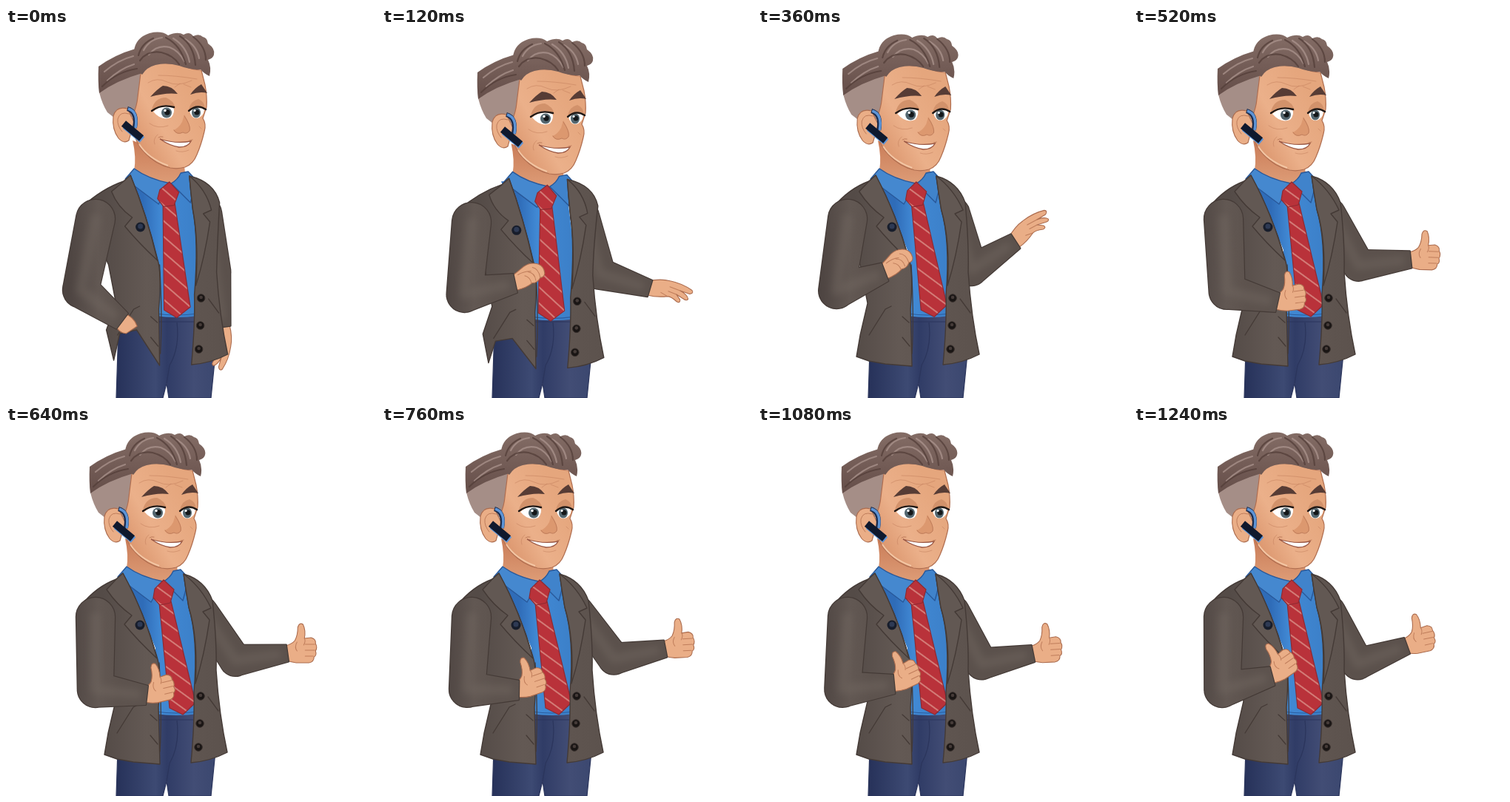
An HTML page for the animation above (1.28 s loop, 500 by 500 pixels).

```html
<!DOCTYPE html>
<html lang="en">
<head>
<meta charset="utf-8">
<title>Thumbs up</title>
<style>
html, body { margin: 0; width: 100%; height: 100%; overflow: hidden; background: #fff; }
svg { display: block; width: 100%; height: 100%; }
.cloth { stroke: #443a36; stroke-width: 1.4; stroke-linejoin: round; }
.sleeve { fill: url(#wool); paint-order: stroke; stroke-width: 2.4; }
.sheen { fill: none; stroke: #756a64; stroke-width: 13; stroke-linecap: round; stroke-linejoin: round; opacity: .4; filter: url(#soft); }
.skin { fill: #eaae87; stroke: #ac6c4e; stroke-width: 1.1; stroke-linejoin: round; }
.line { fill: none; stroke: #443a36; stroke-width: 1.3; stroke-linecap: round; }
.crease { fill: none; stroke: #bf7d5b; stroke-width: 1; stroke-linecap: round; }
.faint { opacity: .5; }
.lock { fill: none; stroke: #ab958e; stroke-width: 2.2; stroke-linecap: round; opacity: .75; }
.shadow { stroke: #533e39; }
</style>
</head>
<body>
<svg viewBox="0 0 500 500">
<defs>
  <filter id="soft" x="-50%" y="-50%" width="200%" height="200%"><feGaussianBlur stdDeviation="5"/></filter>
  <linearGradient id="wool" gradientUnits="userSpaceOnUse" x1="84" y1="0" x2="152" y2="0">
    <stop offset="0" stop-color="#4d4441"/><stop offset=".6" stop-color="#625853"/><stop offset="1" stop-color="#5d534e"/>
  </linearGradient>
  <linearGradient id="coat" gradientUnits="userSpaceOnUse" x1="130" y1="0" x2="300" y2="0">
    <stop offset="0" stop-color="#544b47"/><stop offset=".35" stop-color="#635954"/><stop offset="1" stop-color="#5c524d"/>
  </linearGradient>
  <linearGradient id="shirt" gradientUnits="userSpaceOnUse" x1="185" y1="0" x2="255" y2="0">
    <stop offset="0" stop-color="#2f6cb8"/><stop offset=".35" stop-color="#4189d4"/><stop offset="1" stop-color="#3c80c9"/>
  </linearGradient>
  <linearGradient id="denim" gradientUnits="userSpaceOnUse" x1="150" y1="0" x2="280" y2="0">
    <stop offset="0" stop-color="#27325a"/><stop offset=".4" stop-color="#3d4a73"/><stop offset=".52" stop-color="#303c66"/><stop offset=".8" stop-color="#424d75"/><stop offset="1" stop-color="#3c4870"/>
  </linearGradient>
  <linearGradient id="face" gradientUnits="userSpaceOnUse" x1="160" y1="150" x2="245" y2="100">
    <stop offset="0" stop-color="#dc976f"/><stop offset=".4" stop-color="#ebb08a"/><stop offset="1" stop-color="#e5a67d"/>
  </linearGradient>
  <linearGradient id="neck" x1="0" y1="0" x2="0" y2="1">
    <stop offset="0" stop-color="#c97c58"/><stop offset="1" stop-color="#e0a07a"/>
  </linearGradient>
  <linearGradient id="hair" gradientUnits="userSpaceOnUse" x1="0" y1="10" x2="0" y2="90">
    <stop offset="0" stop-color="#836c65"/><stop offset="1" stop-color="#654e49"/>
  </linearGradient>
  <pattern id="stripes" width="20" height="16" patternUnits="userSpaceOnUse" patternTransform="rotate(36)">
    <path d="M0 0H20V16H0Z" fill="#b9323a"/><path d="M0 8H20" stroke="#dc958c" stroke-width="1.5"/>
  </pattern>
  <g id="thumb">
    <path class="skin" d="M-3-10Q6-12 10-17Q14-24 14-35Q16-42 21-39Q25-31 23-20L32-21Q39-19 38-13Q41-8 38-3Q40 3 36 5Q36 12 29 13L12 13Q4 12-3 9Z"/>
    <path class="crease" d="M23-20Q25-16 22-11M24-12H37M24-4H37M24 4H35M13-15Q9-8 13-3"/>
  </g>
  <g id="fist">
    <path class="skin" d="M-3-10Q10-13 20-16Q31-18 39-11Q45-5 42 4Q39 9 34 7Q28 12 21 9Q12 12-3 9Z"/>
    <path class="crease" d="M30-10Q37-5 34 7M22-7Q30-2 27 8M16-4Q22 1 20 9M8-9Q18-10 26-6"/>
  </g>
  <g id="open">
    <path class="skin" d="M-3-10Q14-14 27-11Q44-8 57 1Q60 5 54 6L41 2Q51 7 52 13Q50 16 46 13L36 7L41 14Q42 19 37 17Q29 10 24 10Q10 12-3 9Z"/>
    <path class="crease" d="M41 2L27-3M36 7L25 3M24 10L15 5"/>
  </g>
  <path id="tucked" class="skin" d="M-4-10Q11-13 21-4L13 12Q4 16-4 10Z"/>
</defs>

<path d="M152 405L204 388H257L283 440L277 500H220L217 480L212 500H149Z" fill="url(#denim)" stroke="#2b355c" stroke-width="1.2"/>
<path d="M203 397H257M231 398Q235 432 221 456L217 480" fill="none" stroke="#2b355c" stroke-width="1.2"/>

<g id="armR"><g><use href="#open"/><use href="#open"/><use href="#thumb"/></g><path class="cloth sleeve" style="fill:#5b514c"/><path class="sheen"/></g>

<g id="torso">
  <path d="M161 203H248L260 300V389Q230 393 202 389V300Z" fill="url(#shirt)"/>
  <path d="M203 386Q230 390 258 386" fill="none" stroke="#2a5c9f" stroke-width="1.2"/>
</g>

<g id="collar">
  <path d="M161 152Q166 175 163 192L206 217L222 206L232 197L230 180Z" fill="url(#neck)"/>
  <path d="M163 190L151 204L196 238L212 210Q182 204 163 190Z" fill="#4588cf" stroke="#28589a" stroke-width="1.4" stroke-linejoin="round"/>
  <path d="M226 196L236 194L247 206L239 236L213 210Q222 205 226 196Z" fill="#4083cb" stroke="#28589a" stroke-width="1.4" stroke-linejoin="round"/>
</g>

<g id="tie" fill="url(#stripes)" stroke="#8f2a31" stroke-width="1.2" stroke-linejoin="round">
  <path d="M207 239L223 237L256 374L239 390L221 381Z"/>
  <path d="M201 220L213 208L227 221L222 239L208 242L199 232Z"/>
</g>

<g id="jacket">
  <path id="left" class="cloth" fill="url(#coat)"/>
  <path id="right" class="cloth" fill="url(#coat)"/>
  <path id="lapels" class="cloth" fill="#625853"/>
  <path class="line" d="M150 415L172 380L180 376M195 390L204 398M195 418L205 430M273 366L287 385M207 320Q211 390 208 440"/>
  <circle cx="181" cy="269" r="6.5" fill="#171d2b"/><circle cx="181" cy="268" r="3.5" fill="#2e3a54"/>
  <g fill="#191514" stroke="#39302d"><circle cx="263" cy="365" r="5.3"/><circle cx="262" cy="402" r="5.3"/><circle cx="260" cy="434" r="5.3"/></g>
  <g fill="#453b38"><circle cx="263" cy="364" r="2.3"/><circle cx="262" cy="401" r="2.3"/><circle cx="260" cy="433" r="2.3"/></g>
</g>

<g id="head">
  <path d="M113 70L114 90Q118 106 125 117L134 124L150 128L161 122L167 98L174 60Z" fill="#a58e87"/>
  <path d="M170 64Q178 54 192 50L222 52Q240 60 252 60L257 80Q260 95 259 110L254 125Q259 133 256 143Q252 160 246 174Q241 187 230 191Q220 194 210 192Q190 187 176 172Q163 160 160 140V119Q165 108 166 96Z" fill="url(#face)" stroke="#b06e50" stroke-width="1.2"/>
  <path d="M168 160Q180 179 207 189" fill="none" stroke="#f3c6a4" stroke-width="2"/>
  <path d="M113 55Q112 75 114 91Q137 74 172 64L176 56L163 31Q135 39 113 55Z" fill="url(#hair)"/>
  <path d="M161 34Q163 16 182 10Q198 6 207 13Q220 7 228 12Q236 7 241 14Q249 10 254 15Q260 16 261 24Q271 31 269 39Q268 44 261 46Q266 56 263 68Q256 65 251 59Q238 60 222 54Q205 49 190 53Q178 56 172 66Q161 58 167 47Q168 41 161 34Z" fill="url(#hair)"/>
  <path class="lock" d="M121 62Q140 46 160 41M125 74Q142 58 161 52M174 33Q182 18 199 16M181 39Q192 25 209 29Q222 34 229 48M214 17Q232 28 236 49M230 18Q246 27 249 44"/>
  <path class="lock shadow" d="M118 82Q138 62 165 58M167 40Q171 24 187 17M169 47Q179 33 198 36Q214 40 222 52M204 16Q224 26 231 52M223 14Q242 26 244 53M241 15Q258 28 258 46"/>
  <path class="crease faint" d="M180 77Q192 69 206 76T239 74M194 67Q217 67 246 72M216 83L223 78M228 79L238 83M182 132Q193 140 207 135M193 147Q186 153 189 160M249 136L252 139M218 169Q226 172 235 168"/>
  <g fill="#d2926b"><path d="M185 113Q189 97 204 97Q215 101 217 112Q202 102 185 113Z"/><path d="M235 113Q238 101 248 99Q256 102 257 112Q246 104 235 113Z"/></g>
  <g fill="#573c35"><path d="M183 96Q193 85 200 81Q212 81 220 92Q204 90 183 96Z"/><path d="M237 93Q243 84 252 79L260 91Q250 88 237 93Z"/></g>
  <g fill="#fff"><path d="M187 116Q199 106 214 110Q217 117 211 124Q198 129 187 116Z"/><path d="M236 115Q246 106 256 113Q255 123 246 125Q238 125 236 115Z"/></g>
  <g fill="#53666f"><circle cx="205" cy="117.500" r="7"/><ellipse cx="245" cy="117.500" rx="6" ry="7"/></g>
  <g fill="#141719"><circle cx="206" cy="117" r="3.7"/><circle cx="246" cy="117" r="3.500"/></g>
  <g fill="#fff"><circle cx="203" cy="114.500" r="1.7"/><circle cx="243" cy="114.500" r="1.6"/></g>
  <path d="M185 115Q198 105 215 110M235 115Q246 105 258 113" fill="none" stroke="#201815" stroke-width="2.4" stroke-linecap="round"/>
  <path d="M229 120Q237 133 237 140Q234 147 227 144Q220 149 214 141Q221 139 226 130Z" fill="#dc986f"/>
  <path class="crease" d="M229 122Q238 135 236 142Q232 147 227 144Q219 148 215 141"/>
  <path d="M196 153Q218 160 238 156Q234 164 222 164Q209 162 196 153Z" fill="#fff" stroke="#9a5743" stroke-width="1.3"/>
  <path d="M194 151Q197 149 200 150M236 155L240 154" class="crease"/>
  <path class="skin" d="M152 112Q137 108 133 122Q131 140 140 152Q147 160 154 155L161 130Z"/>
  <path class="crease" d="M154 119Q142 115 139 126Q138 135 145 143"/>
  <g fill="none">
    <path d="M152 112Q166 116 162 138" stroke="#1c2b4b" stroke-width="6"/>
    <path d="M153 112Q167 116 163 138" stroke="#5d94d6" stroke-width="3.500"/>
    <path d="M149 135L172 154" stroke="#5d94d6" stroke-width="10"/>
    <path d="M147 132L171 152" stroke="#0f192e" stroke-width="9.500"/>
  </g>
</g>

<g id="armL"><g><use href="#tucked"/><use href="#fist"/><use href="#thumb"/></g><path class="cloth sleeve"/><path class="sheen"/></g>
</svg>

<script>
const LOOP = 1280, STEP = 40;
const $ = id => document.getElementById(id);
const move = (id, x, y, more = '') => $(id).setAttribute('transform', `translate(${x} ${y}) ${more}`);
const clamp = (v, lo, hi) => Math.min(hi, Math.max(lo, v));
const mix = (a, b, k) => a + (b - a) * k;
const ease = (t, from, to) => { const k = clamp((t - from) / (to - from), 0, 1); return k * k * (3 - 2 * k); };

// key points: time, x, y
const headPath = [[0, 12, -3], [120, 16, 5], [240, 6, 0], [440, 0, 0]];
const arms = {
  armL: {
    shoulder: [121, 258], upper: 98, fore: 70, radii: [26, 24, 13], bend: [-7, -12, -20],
    wrist: [[0, 157, 396], [120, 180, 345], [240, 157, 303], [520, 194, 371], [760, 185, 357], [920, 181, 360], [1240, 187, 338]]
  },
  armR: {
    shoulder: [266, 250], upper: 80, fore: 71, radii: [19, 21, 11.5], bend: [6, -15, 8],
    wrist: [[0, 292, 404], [120, 362, 352], [240, 334, 272], [520, 374, 313], [760, 383, 301], [920, 377, 318], [1240, 369, 297]]
  }
};

// monotone cubic through the key points
function along(rows, t) {
  const last = rows.length - 1;
  if (t >= rows[last][0]) return rows[last].slice(1);
  const i = rows.findIndex(r => r[0] > t) - 1;
  const a = rows[i], b = rows[i + 1], h = b[0] - a[0], u = (t - a[0]) / h;
  const slope = (k, c) => (rows[k + 1][c] - rows[k][c]) / (rows[k + 1][0] - rows[k][0]);
  const tangent = (k, c) => {
    if (k === 0 || k === last) return 0;
    const p = slope(k - 1, c), q = slope(k, c);
    return p * q > 0 ? 2 * p * q / (p + q) : 0;
  };
  return [1, 2].map(c => mix(a[c], b[c], u * u * (3 - 2 * u))
    + h * u * (1 - u) * (tangent(i, c) * (1 - u) - tangent(i + 1, c) * u));
}

function taper(x1, y1, r1, x2, y2, r2, flat) {
  const a = Math.atan2(y2 - y1, x2 - x1), nx = Math.sin(a), ny = -Math.cos(a);
  const at = (x, y, r) => `${x + nx * r} ${y + ny * r}`;
  const end = flat ? 'L' : `A${r2} ${r2} 0 0 1 `;
  return `M${at(x1, y1, r1)}L${at(x2, y2, r2)}${end}${at(x2, y2, -r2)}`
    + `L${at(x1, y1, -r1)}A${r1} ${r1} 0 0 1 ${at(x1, y1, r1)}Z`;
}

// the elbow follows from the two bone lengths
function drawArm(id, t, shiftX, shiftY) {
  const { shoulder, upper, fore, radii: [rs, re, rw], bend, wrist } = arms[id];
  const sx = shoulder[0] + shiftX, sy = shoulder[1] + shiftY;
  const [wx, wy] = along(wrist, t);
  const reach = Math.hypot(wx - sx, wy - sy);
  const cos = (upper ** 2 + reach ** 2 - fore ** 2) / (2 * upper * reach);
  const a = Math.atan2(wy - sy, wx - sx) + Math.acos(clamp(cos, -1, 1));
  const ex = sx + upper * Math.cos(a), ey = sy + upper * Math.sin(a);

  const [hand, sleeve, sheen] = $(id).children;
  sleeve.setAttribute('d', taper(sx, sy, rs, ex, ey, re) + taper(ex, ey, re, wx, wy, rw, true));
  sheen.setAttribute('d', `M${sx} ${sy}L${ex} ${ey}L${mix(ex, wx, .8)} ${mix(ey, wy, .8)}`);

  const shown = t < 80 ? 0 : t < 380 ? 1 : 2;
  const turn = Math.atan2(wy - ey, wx - ex) * 180 / Math.PI + bend[shown];
  hand.setAttribute('transform', `translate(${wx} ${wy}) rotate(${turn})`);
  [...hand.children].forEach((el, i) => { el.style.display = i === shown ? '' : 'none'; });
}

function drawJacket(n, tuck) {
  const point = (x, y, tx, ty) => `L${mix(x, tx, tuck)} ${mix(y, ty, tuck)}`;
  const hem = point(138, 415, 135, 408) + point(133, 444, 145, 449) + point(150, 450, 153, 413)
    + point(172, 454, 176, 408) + point(208, 457, 207, 456);
  const neckL = `${158 + n * .8} 199`, neckR = `${240 + n * .6} 200`;
  const topL = `M${neckL}L${149 + n * .8} 207`;
  const edgeL = `Q${187 + n * .2} 252 ${neckL}Z`;
  const edgeR = `Q260 288 ${247 + n * .4} 245Q${243 + n * .5} 222 ${neckR}Z`;
  $('left').setAttribute('d', `${topL}Q${122 + n * .6} 217 102 242L138 320L148 372${hem}L206 380Q210 330 204 312${edgeL}`);
  $('right').setAttribute('d', `M${neckR}Q${269 + n} 208 ${279 + n * .75} 236Q285 290 284 330Q288 390 299 441Q276 453 250 455Q255 400 254 360${edgeR}`);
  $('lapels').setAttribute('d',
    `${topL}L${136 + n * .5} 221Q150 242 170 256L160 268Q180 292 204 314${edgeL}`
    + `M${neckR}Q${264 + n * .5} 218 277 246L266 251L275 262Q268 310 256 348${edgeR}`);
}

function frame() {
  const t = Math.floor(performance.now() % LOOP / STEP) * STEP;
  const [n, nod] = along(headPath, t);
  const dip = 5 * Math.sin(Math.PI * Math.min(t / 360, 1));
  move('head', n, nod);
  move('collar', n * .85, dip);
  move('tie', n * .62, dip, `rotate(${n * .42} 214 212)`);
  move('torso', 0, dip);
  move('jacket', n * .05, dip);
  drawJacket(n, 1 - ease(t, 80, 240));
  drawArm('armL', t, 0, dip);
  drawArm('armR', t, n * .5, dip);
  requestAnimationFrame(frame);
}
frame();
</script>
</body>
</html>
```
